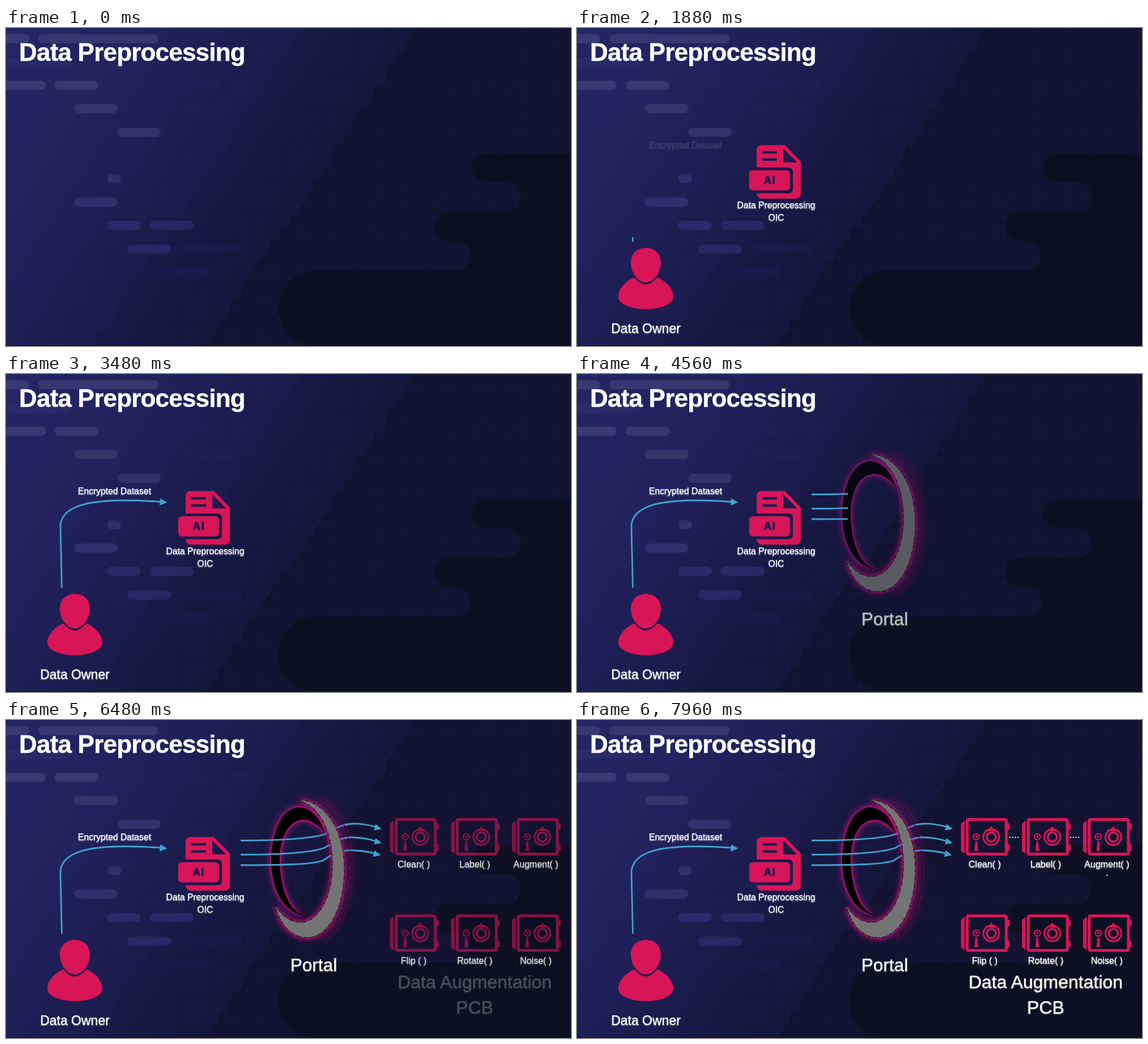
Animation, 997 px wide and 561 px high, one loop 8 s. Source, as an HTML page:

```html
<!DOCTYPE html>
<html lang="en">
<head>
<meta charset="utf-8">
<title>Data Preprocessing</title>
<style>
  html, body { margin: 0; width: 100%; height: 100%; overflow: hidden; background: #131330; }
  svg { display: block; width: 100vw; height: 100vh; }
  text { font-family: "Liberation Sans", Arial, sans-serif; fill: #fff; text-anchor: middle; }
  .label { text-shadow: 0 1px 2px rgba(255, 255, 255, .45); stroke: #fff; stroke-width: .25px; }
  .small { font-size: 15.7px; }
  .call { font-size: 16px; }
  .title { font-size: 44px; font-weight: 700; letter-spacing: -.8px; text-anchor: start; stroke: #fff; stroke-width: .5px; }
  .badge { font: 700 18.5px Inter, sans-serif; letter-spacing: 1.2px; fill: #1c1b4d; stroke: #1c1b4d; stroke-width: .7px; }
  .red { fill: #d81557; }
  .line { fill: none; stroke: #3fa3cf; stroke-width: 2.8; }
  .head { fill: #3fa3cf; }
  .glow { filter: drop-shadow(0 0 2.5px #e5148a) drop-shadow(0 0 6px #c8127c); }
  .rough { fill: none; stroke: #08060c; stroke-width: 1.3; stroke-dasharray: 2 1.5 5 1 1 2; }
</style>
</head>
<body>
<svg viewBox="0 0 997 561" preserveAspectRatio="none">
  <defs>
    <linearGradient id="sky" gradientUnits="userSpaceOnUse" x1="0" y1="0" x2="502" y2="331">
      <stop offset="0" stop-color="#24275f"/>
      <stop offset=".35" stop-color="#1f2057"/>
      <stop offset=".7" stop-color="#191a48"/>
      <stop offset="1" stop-color="#15163b"/>
    </linearGradient>
    <pattern id="dots" width="18.2" height="18.2" patternUnits="userSpaceOnUse">
      <circle cx="7.5" cy="4.5" r="2.1" fill="#23236a"/>
    </pattern>
    <g id="safe">
      <rect x="688.5" y="175.5" width="69" height="61" rx="2" fill="none" stroke="#d81557" stroke-width="5"/>
      <path class="red" d="M684,177V236L677.5,231V183ZM760,182h1q2.5,0 2.5,3v6q0,3 -2.5,3h-1ZM760,219h1q2.5,0 2.5,3v6q0,3 -2.5,3h-1Z"/>
      <g fill="none" stroke="#d81557">
        <circle cx="731" cy="206.5" r="14" stroke-width="3"/>
        <circle cx="731" cy="206.5" r="8" stroke-width="3.6"/>
        <circle cx="704.5" cy="206" r="5.4" stroke-width="2.2"/>
      </g>
      <circle class="red" cx="704.5" cy="206" r="2"/>
      <path class="red" d="M731,187L737,196H725ZM703,214h3l1.8,17h-6.6Z"/>
    </g>
  </defs>

  <rect width="997" height="561" fill="url(#sky)"/>
  <g id="bands"></g>
  <rect width="997" height="561" fill="url(#dots)" opacity=".3"/>
  <g id="pills"></g>
  <path fill="#0f0f23" d="M997,221H848a25.5,25.5 0 0 0 0,51H883a26,26 0 0 1 0,52H782a26,26 0 0 0 0,52H794a26,26 0 0 1 0,52H547a66.5,66.5 0 0 0 0,133H997Z"/>
  <rect y="560" width="997" height="1" fill="#0b0b1e"/>
  <text class="title" x="23" y="57.5">Data Preprocessing</text>

  <g id="file">
    <path class="red" fill-rule="evenodd" d="M317,246V216q0,-9.5 9.5,-9.5H367L395,235.5V292q0,9 -9,9H326q-7,0 -9,-9.5H373q8,0 8,-8V254q0,-8 -8,-8ZM364,212.5V237H388.5ZM329,217a2.3,2.3 0 0 0 0,4.6H351a2.3,2.3 0 0 0 0,-4.6ZM329,229.7a2.3,2.3 0 0 0 0,4.6H351a2.3,2.3 0 0 0 0,-4.6Z"/>
    <rect class="red" x="303.8" y="251" width="72" height="35.5" rx="6"/>
    <text class="badge" x="340.2" y="275.4">AI</text>
  </g>
  <g id="fileLabel" class="label small">
    <text x="351.5" y="318">Data Preprocessing</text>
    <text x="351.5" y="340">OIC</text>
  </g>

  <g id="owner">
    <path class="red" d="M121.5,388C137,388 148,398 148,414C148,432 135,449 121.5,449C108,449 95,432 95,414C95,398 106,388 121.5,388ZM101,440C108,448 115,452.5 121.5,452.5C128,452.5 135,448 142,440C157,446 170,460 170,474C170,487 148,496 121.5,496C95,496 73,487 73,474C73,460 86,446 101,440Z"/>
    <text class="label" x="121.5" y="538" font-size="23">Data Owner</text>
  </g>

  <text id="dataset" class="label small" x="191.5" y="212">Encrypted Dataset</text>
  <g id="feed"></g>

  <g id="ringBack" class="glow">
    <path d="M563,200C556,170 535,153 515,154C485,157 468,200 468,250C469,305 495,345 531,344C503,345 484,300 483,250C482,205 500,176 525,176C540,176 553,187 563,200Z"/>
  </g>
  <g id="streams"></g>
  <g id="ringFront">
    <g class="glow">
      <path id="band" fill="#747474" d="M513,141C560,139 597,190 597,262C597,335 568,384 531,384C505,384 482,362 475,325C486,347 503,357 521,357C553,355 576,310 576,255C576,196 553,150 513,141Z"/>
      <path class="rough" d="M552,139C590,150 609,200 609,262C609,320 592,368 560,387"/>
    </g>
    <path class="rough" d="M513,141C560,139 597,190 597,262C597,335 568,384 531,384C505,384 482,362 475,325C486,347 503,357 521,357C553,355 576,310 576,255C576,196 553,150 513,141Z"/>
    <text class="label" x="543" y="443" font-size="31.5">Portal</text>
  </g>

  <g id="safes"></g>
  <g id="calls" class="label call"></g>
  <g id="board" class="label" font-size="32">
    <text x="827" y="473">Data Augmentation</text>
    <text x="827" y="518">PCB</text>
  </g>
  <g id="links" fill="#fff"></g>
</svg>

<script>
const LOOP = 8000;
const $ = id => document.getElementById(id);

function add(parent, tag, attrs, text) {
  const el = document.createElementNS("http://www.w3.org/2000/svg", tag);
  for (const key in attrs) el.setAttribute(key, attrs[key]);
  if (text) el.textContent = text;
  parent.appendChild(el);
  return el;
}

// Diagonal background bands with stepped edges
let seed = 7;
const random = () => (seed = seed * 16807 % 2147483647) / 2147483647;
function edge(topX, jitter) {
  let d = "";
  for (let y = 0; y < 561; y += 20.6) {
    const x = topX - y * 0.67 + (random() - 0.5) * jitter;
    d += `L${x},${y}L${x - 8},${y + 20.6}`;
  }
  return d;
}
[300, 400, 525].forEach(x =>
  add($("bands"), "path", { d: `M-400,0${edge(x, 20)}L-400,561Z`, fill: "#282a6c", opacity: 0.13 }));
add($("bands"), "path", { d: `M997,0${edge(724, 10)}L997,561Z`, fill: "#13132f", opacity: 0.85 });

// Rounded bars: left, right, top, colour, opacity
[
  [-20, 41, 11, "#3a3b74", .9], [57, 269, 11, "#3a3b74", .85], [-20, 115, 53, "#3a3b74", .3],
  [-20, 70, 93, "#3a3b74", .95], [86, 163, 93, "#3a3b74", .9],
  [225, 271, 93, "#232462", .2], [289, 379, 93, "#232462", .25], [396, 430, 93, "#232462", .25],
  [120, 197, 134, "#37386f", .9], [309, 405, 134, "#232462", .25],
  [196, 273, 176, "#34356f", .9], [179, 203, 258, "#30316f", .9], [120, 197, 299, "#31326f", .9],
  [178, 238, 340, "#2b2c6c", .9], [254, 331, 340, "#2a2a69", .9],
  [214, 291, 382, "#2a2a69", .9], [309, 417, 382, "#212161", .25], [257, 361, 423, "#212161", .25]
].forEach(([left, right, y, fill, opacity]) =>
  add($("pills"), "rect", { x: left, y, width: right - left, height: 16, rx: 8, fill, opacity }));

function arrow(parent, d, head) {
  return {
    line: add(parent, "path", { d, class: "line", pathLength: 1 }),
    head: add(parent, "path", { d: head, class: "head" })
  };
}
const feed = arrow($("feed"),
  "M98.5,377L96,270C96,240 128,223.5 205,223Q240,223 273,225.5",
  "M272,219.5L284.5,226.5L271,232Z");
const streams = [
  arrow($("streams"), "M414,212.5C485,212.5 540,209 564,201C580,193 590,184 612,183Q630,182.5 652,188.5", "M652,183.5L663,192L649.5,195Z"),
  arrow($("streams"), "M414,237.5C485,237.5 540,234 563,225C578,216 592,207 610,207Q630,207 652,213.5", "M652,208L663,217L649.5,219.5Z"),
  arrow($("streams"), "M414,256C500,256 540,254.5 559,248C574,238 586,230 608,230Q628,230 650,235", "M650.5,230L661.5,238.5L647.5,241.5Z")
];

[["Clean( )", "Label( )", "Augment( )"], ["Flip ( )", "Rotate( )", "Noise( )"]].forEach((row, r) =>
  row.forEach((name, c) => {
    const x = 107.7 * c, y = 170 * r;
    add($("safes"), "use", { href: "#safe", x, y });
    add($("calls"), "text", { x: 719.5 + x, y: 260 + y }, name);
  }));

// Dotted links, uncovered from left to right
const links = [[763.3, 6940, 7300], [870, 7460, 7780]].map(([x, from, to]) => ({
  from, to,
  dots: [0, 1, 2, 3].map(i => add($("links"), "rect", { x: x + i * 4.67, y: 206, height: 2 }))
}));
const drop = add($("links"), "rect", { x: 934, y: 273, width: 2, height: 2 });

const ramp = (t, from, to) => Math.min(1, Math.max(0, (t - from) / (to - from)));
const show = (id, value) => $(id).setAttribute("opacity", value);

// A caption and its shadow add up, so it brightens sooner than its icon
const caption = p => 1 - (1 - p) ** 2;

function trace(a, p) {
  a.line.setAttribute("stroke-dasharray", `${p} 2`);
  a.line.setAttribute("visibility", p > 0 ? "visible" : "hidden");
  a.head.setAttribute("visibility", p > 0.97 ? "visible" : "hidden");
}

function draw(t) {
  const file = ramp(t, 740, 1240);
  show("file", file);
  show("fileLabel", caption(file));
  show("owner", ramp(t, 1250, 1750));
  show("dataset", ramp(t, 1815, 2340));
  trace(feed, ramp(t, 1845, 3240));

  const scale = 1 + 0.07 * Math.sin(Math.PI * ramp(t, 3180, 3470));
  $("file").setAttribute("transform", `translate(350 254) scale(${scale}) translate(-350 -254)`);

  const ring = ramp(t, 4180, 4700);
  show("ringBack", ring);
  show("ringFront", ring);
  streams.forEach(s => trace(s, ramp(t, 4190, 5600)));

  const safes = ramp(t, 6300, 6600);
  show("safes", safes);
  show("calls", caption(safes));
  show("board", ramp(t, 6320, 6940));

  links.forEach(({ from, to, dots }) => {
    const reach = 16 * ramp(t, from, to);
    dots.forEach((dot, i) => dot.setAttribute("width", Math.min(2, Math.max(0, reach - i * 4.67))));
  });
  drop.setAttribute("opacity", ramp(t, 7890, 7960));
}

const start = performance.now();
function tick(now) {
  draw(Math.max(0, now - start) % LOOP);
  requestAnimationFrame(tick);
}
draw(0);
requestAnimationFrame(tick);
</script>
</body>
</html>
```
